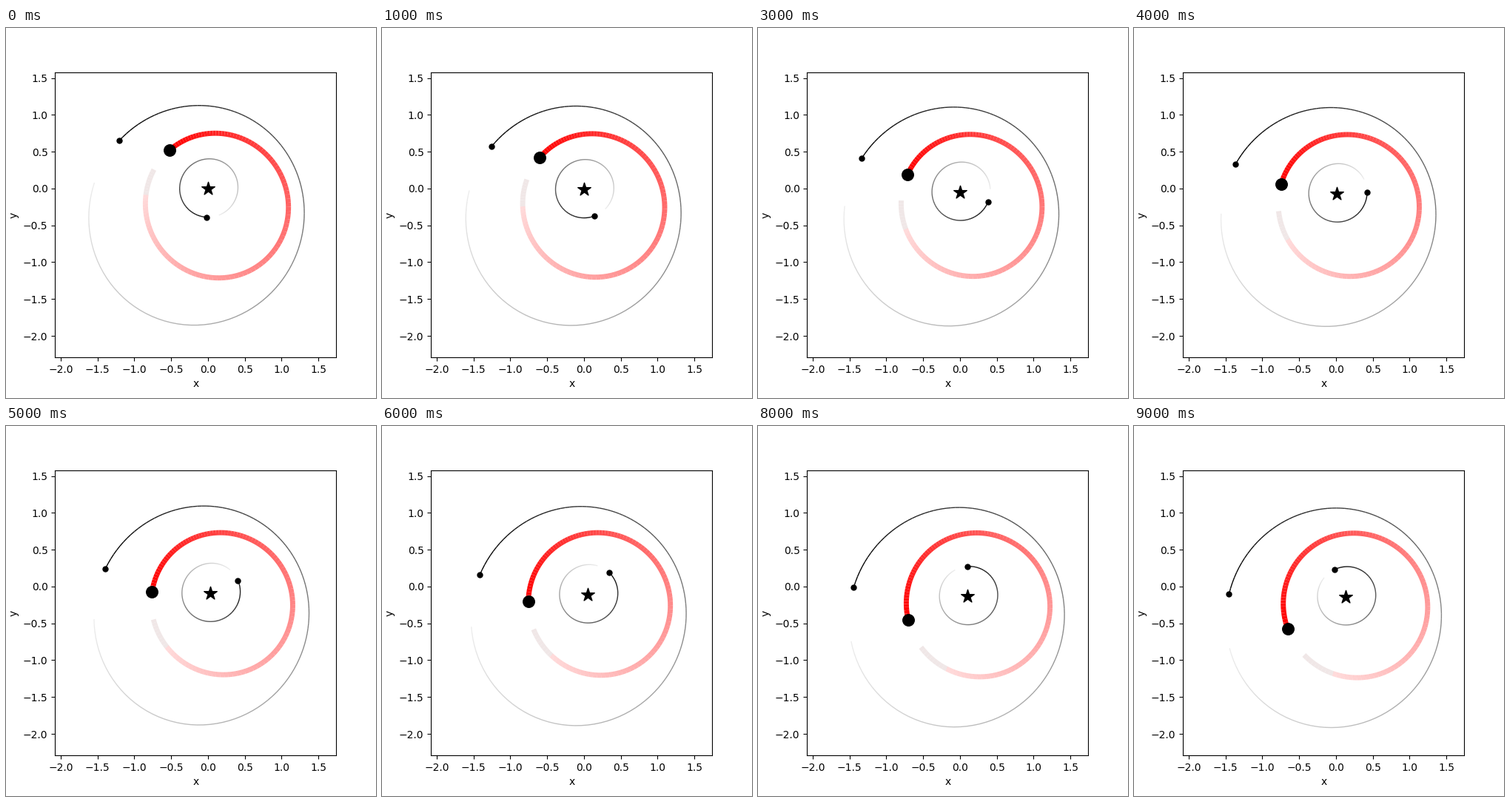
A matplotlib script for the animation above (10000 ms loop, 500 by 500 pixels).

```python
import numpy as np
import matplotlib.pyplot as plt
from matplotlib.animation import FuncAnimation
from matplotlib.collections import LineCollection

FRAMES = 10
DT = 0.1          # simulated time per frame
SUBSTEPS = 100
ARC = 128         # segments per orbit
CUT, PALE = 0.064, 0.138   # tail fades out below CUT, is pale pink below PALE


def kepler_state(mu, a, e, f, inc=0.0, node=0.0, peri=0.0):
    """Position and velocity relative to the primary."""
    cn, sn, ci, si = np.cos(node), np.sin(node), np.cos(inc), np.sin(inc)
    along = np.array([cn, sn, 0])
    across = np.array([-sn * ci, cn * ci, si])
    u = peri + f
    r = a * (1 - e * e) / (1 + e * np.cos(f))
    v0 = np.sqrt(mu / (a * (1 - e * e)))
    pos = r * (np.cos(u) * along + np.sin(u) * across)
    vel = v0 * (-(np.sin(u) + e * np.sin(peri)) * along
                + (np.cos(u) + e * np.cos(peri)) * across)
    return pos, vel


def true_anomaly(mean, e):
    ecc = mean
    for _ in range(20):
        ecc -= (ecc - e * np.sin(ecc) - mean) / (1 - e * np.cos(ecc))
    return 2 * np.arctan2(np.sqrt(1 + e) * np.sin(ecc / 2),
                          np.sqrt(1 - e) * np.cos(ecc / 2))


def center(values, n):
    """Mass-weighted mean of the first n bodies."""
    return mass[:n] @ values[:n] / mass[:n].sum()


mass = np.array([1, 0.1, 1e-3, 1e-3])
planets = [
    dict(a=0.4, e=0.041, f=0.43, inc=0.2, node=0.82, peri=2.98),
    dict(a=1.0, e=0.24, f=0.0, peri=2.14),
    dict(a=1.5, e=0.24, f=true_anomaly(2.1 - 1.14, 0.24), peri=1.14),
]


def initial_state():
    pos, vel = np.zeros((4, 3)), np.zeros((4, 3))
    for i, planet in enumerate(planets, 1):
        dp, dv = kepler_state(mass[:i + 1].sum(), **planet)
        pos[i] = center(pos, i) + dp
        vel[i] = center(vel, i) + dv
    return np.array([pos, vel])


def derivative(state):
    pos, vel = state
    d = pos[None] - pos[:, None]
    dist2 = (d ** 2).sum(-1) + np.eye(4)
    acc = (d * (mass / dist2 ** 1.5)[..., None]).sum(1)
    return np.array([vel, acc])


def advance(state):
    h = DT / SUBSTEPS
    for _ in range(SUBSTEPS):
        k1 = derivative(state)
        k2 = derivative(state + h / 2 * k1)
        k3 = derivative(state + h / 2 * k2)
        k4 = derivative(state + h * k3)
        state = state + h / 6 * (k1 + 2 * k2 + 2 * k3 + k4)
    return state


def orbit_points(state, i):
    """Ellipse of body i, sampled once around, starting at the body."""
    pos, vel = state
    base = center(pos, i)
    r, v = pos[i] - base, vel[i] - center(vel, i)
    mu = mass[:i + 1].sum()
    h = np.cross(r, v)
    e1 = r / np.linalg.norm(r)
    e2 = np.cross(h / np.linalg.norm(h), e1)
    ecc = np.cross(v, h) / mu - e1
    t = np.linspace(0, 2 * np.pi, ARC + 1)[:, None]
    d = np.cos(t) * e1 + np.sin(t) * e2
    radius = (h @ h) / mu / (1 + d @ ecc)
    return (base + radius[:, None] * d)[:, :2]


alpha = np.linspace(0, 1, ARC)
shown = alpha >= CUT


def fading(rgb):
    colors = np.column_stack([np.tile(rgb, (ARC, 1)), alpha])
    if rgb[0]:
        colors[alpha < PALE] = (0.94, 0.905, 0.905, 1)
    return colors[shown]


states = [advance(initial_state())]
while len(states) < FRAMES:
    states.append(advance(states[-1]))

fig, ax = plt.subplots(figsize=(5, 5), dpi=100)
ax.set_aspect("equal")
ax.set_xlim(-2.0757, 1.7415)
ax.set_ylim(-2.2911, 1.5763)
ax.set_xlabel("x")
ax.set_ylabel("y")

BLACK, RED = (0, 0, 0), (1, 0, 0)
trails = [ax.add_collection(LineCollection([], colors=fading(rgb), linewidths=lw))
          for rgb, lw in ((BLACK, 1), (RED, 5), (BLACK, 1))]


def markers(bodies, size, marker="o"):
    zero = [0] * len(bodies)
    dots = ax.scatter(zero, zero, s=size, marker=marker, color="black", zorder=3)
    return bodies, dots


groups = [markers([1, 3], 25), markers([2], 125), markers([0], 175, "*")]


def draw(n):
    state = states[n]
    for i, trail in enumerate(trails, 1):
        pts = orbit_points(state, i)
        trail.set_segments(np.stack([pts[:-1], pts[1:]], axis=1)[shown])
    for bodies, dots in groups:
        dots.set_offsets(state[0][bodies, :2])
    return [*trails, *(dots for _, dots in groups)]


anim = FuncAnimation(fig, draw, frames=FRAMES, interval=1000,
                     repeat=True, repeat_delay=0)
plt.show()
```
